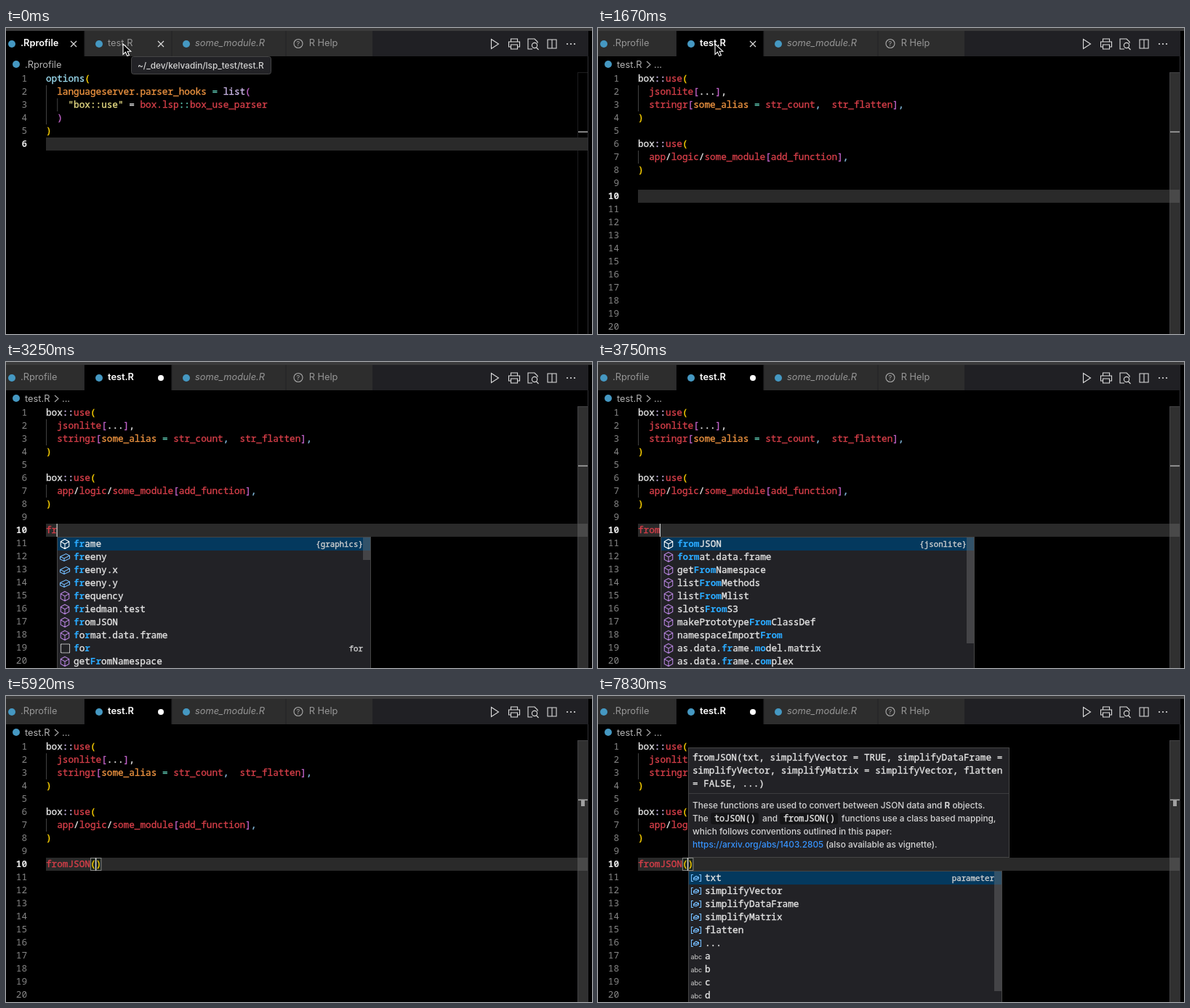
An HTML page that plays this animation: 806 px wide and 422 px high, repeating every 8000 ms.

```html
<!DOCTYPE html>
<html lang="en">
<head>
<meta charset="utf-8">
<title>Editor completion</title>
<style>
html, body { margin: 0; width: 100%; height: 100%; overflow: hidden; background: #000; }
svg { display: block; }
text { white-space: pre; }
.mono { font: 500 12.7px "Noto Sans Mono", "DejaVu Sans Mono", monospace; stroke-width: .35; }
.ui { font: 12.8px Inter, "Open Sans", sans-serif; }
.ui.small { font-size: 11.8px; font-weight: 500; }
.ui.tiny { font-size: 9px; }
.ui.italic { font-style: italic; }
.ui.active { font-weight: 600; }
.mono.current { font-weight: 700; }
.line { fill: none; stroke-width: 1.1; }
</style>
</head>
<body>
<svg id="stage" width="806" height="422"></svg>
<script>
const LOOP = 8000, CHAR = 7.62, LEFT = 55;
const SWITCH = 830, READY = 1000, TYPING = 2670, ACCEPT = 5080, CALL = 5830;
const COLORS = {
  w: '#e4e4e4', r: '#d63f49', o: '#ee9440', s: '#e6db83', c: '#9cdcf0', l: '#cdb9ea',
  p: '#c062c8', y: '#ffd400', t: '#5fc9b4', k: '#7fb6d8', b: '#2aaaff', g: '#d0d0d0'
};
const stage = document.getElementById('stage');
const timed = [];

// Adds markup that is visible from one time to another.
function show(markup, from = 0, to = LOOP) {
  const g = document.createElementNS('http://www.w3.org/2000/svg', 'g');
  g.innerHTML = markup;
  stage.append(g);
  timed.push({ g, from, to });
  return g;
}

const rect = (x, y, w, h, fill, more = '') =>
  `<rect x="${x}" y="${y}" width="${w}" height="${h}" fill="${fill}" ${more}/>`;
const path = (d, color, x = 0, y = 0) =>
  `<path class="line" d="${d}" stroke="${color}" transform="translate(${x} ${y})"/>`;
const dot = (x, y, r, fill) => `<circle cx="${x}" cy="${y}" r="${r}" fill="${fill}"/>`;
const ui = (x, y, str, fill = '#ccc', kind = '') =>
  `<text class="ui ${kind}" x="${x}" y="${y + 3.8}" fill="${fill}">${str}</text>`;
const small = (x, y, str) => ui(x, y, str, '#d4d4d4', 'small');

// "~r" starts a run in the colour r; matched letters (~b) are bold.
function mono(x, y, str, more = '') {
  const runs = str.split('~').slice(1).map(run => {
    const color = COLORS[run[0]];
    const ink = run[0] === 'b' ? 'font-weight="700"' : `stroke="${color}"`;
    return `<tspan fill="${color}" ${ink}>${run.slice(1)}</tspan>`;
  });
  return `<text class="mono" x="${x}" y="${y + 4}" ${more}>${runs.join('')}</text>`;
}

const rowY = n => 52 + 18 * n;
const guide = (col, first, last) =>
  rect(LEFT + col * CHAR, rowY(first) - 9, 1, (last - first + 1) * 18, '#404040');

function editor(lines, count, active, guides) {
  let out = rect(LEFT, rowY(active) - 9, 745, 18, '#2a2a2a') + guides;
  for (let n = 1; n <= count; n++) {
    const current = n === active;
    out += `<text class="mono ${current ? 'current' : ''}" x="29" y="${rowY(n) + 4}" ` +
      `text-anchor="end" fill="${current ? '#e4e4e4' : '#858585'}">${n}</text>`;
  }
  lines.forEach((line, i) => {
    const str = line.trimStart();
    out += mono(LEFT + (line.length - str.length) * CHAR, rowY(i + 1), str);
  });
  return out;
}

// Window frame, tabs and toolbar
const R_BLUE = '#4598c2';
const cross = x => path('M-4-4L4 4M4-4L-4 4', '#ddd', x, 22);
show(rect(0, 0, 806, 4, '#3b3b3c') + rect(0, 4, 801, 35, '#202024') +
  rect(0, 4, 504, 35, '#2d2d2d') +
  [107.5, 227.5, 384.5].map(x => rect(x, 4, 1, 35, '#222224')).join('') +
  rect(786, 61, 1, 361, '#1d1d1f') + rect(786, 61, 15, 1, '#1d1d1f') + rect(800, 39, 1, 383, '#303033'));

function tabs(active) {
  const label = (i, x, str) => i === active
    ? ui(x, 21.5, str, '#fff', 'active') : ui(x, 21.5, str, '#969696');
  return rect(active * 108, 4, active ? 119.5 : 107.5, 35, '#000') +
    [8, 128, 248].map(x => dot(x, 22, 5, R_BLUE)).join('') +
    label(0, 20, '.Rprofile') + label(1, 140, 'test.R') +
    ui(260, 21.5, 'some_module.R', '#969696', 'italic') +
    `<circle class="line" cx="402" cy="21.5" r="6" stroke="#aaa"/>` +
    ui(399.6, 21.2, '?', '#aaa', 'tiny') + ui(416.7, 21.5, 'R Help', '#969696') +
    dot(14, 50, 5, R_BLUE) + ui(26, 51, active ? 'test.R' : '.Rprofile', '#b4b4b4');
}
show(tabs(0) + cross(93) + cross(213), 0, SWITCH);
show(tabs(1), SWITCH);
show(cross(213), SWITCH, TYPING);
show(dot(213, 22, 4, '#fff'), TYPING);
show(path('M67 46L72 50.5L67 55', '#aaa') + ui(77, 51, '...', '#b4b4b4'), READY);

const actions =
  path('M-4.5-6.5L5.5 0L-4.5 6.5Z', '#ddd', 672, 22) +
  path('M-4.5-3V-7H4.5V-3M-4.5 4H-7.5V-3H7.5V4H4.5M-4.5 1H4.5V7H-4.5Z', '#ddd', 699, 22) +
  path('M-1 7H-7V-7H2L6-3V-1M7.5 8L4.5 5', '#ddd', 725, 22) +
  `<circle class="line" cx="727" cy="24" r="3.6" stroke="#ddd"/>`;
show(actions, 0, SWITCH);
show(actions, READY);
show(path('M-6-6H6V6H-6ZM0-6V6', '#ddd', 751, 22) +
  [772, 777, 782].map(x => dot(x, 22, 1.1, '#ddd')).join(''));

// Editor contents
show(editor([
  '~coptions~y(',
  '  ~olanguageserver.parser_hooks~w ~t=~w ~llist~p(',
  '    ~s"box::use"~w = ~rbox.lsp~t::~rbox_use_parser',
  '  ~p)',
  '~y)'
], 6, 6, guide(0, 2, 4) + guide(2, 3, 3)), 0, SWITCH);

show(editor([
  '~wbox~l::~ruse~y(',
  '  ~rjsonlite~p[~w...~p]~w,',
  '  ~rstringr~p[~osome_alias~w ~t=~w ~rstr_count~k,  ~rstr_flatten~p]~k,',
  '~y)',
  '',
  '~wbox~l::~ruse~y(',
  '  ~rapp~w/~rlogic~w/~rsome_module~p[~radd_function~p]~k,',
  '~y)'
], 20, 10, guide(0, 2, 3) + guide(0, 7, 7)), SWITCH);

show(rect(786, 61, 14, 361, '#797979', 'opacity=".4"'), READY);
show(rect(787, 142.5, 13, 1.6, '#a5a5a5'));
show(rect(791, 143, 5, 9, '#a0a0a0'), ACCEPT);

const strokes = [
  [330, 0, ''], [910, 0, ''], [TYPING, 1, 'f'], [2920, 2, 'fr'], [3500, 3, 'fro'],
  [3750, 4, 'from'], [ACCEPT, 8, 'fromJSON'], [CALL, 9, 'fromJSON']
];
strokes.forEach(([from, , str], i) => {
  if (str) show(mono(LEFT, rowY(10), '~r' + str), from, strokes[i + 1]?.[0]);
});
const parenBox = col =>
  rect(LEFT + col * CHAR + .5, 223.5, 6.8, 17, '#1a211a', 'stroke="#888"');
show(parenBox(8) + parenBox(9) + mono(LEFT + 8 * CHAR, rowY(10), '~y()'), CALL);
const caret = show(rect(0, 0, 1.2, 18, '#d0d0d0'));

// Completion lists: each item is an icon key followed by its label
const CUBE = 'M0-6.5L5.7-3.4V3.4L0 6.5L-5.7 3.4V-3.4ZM-5.7-3.4L0 0L5.7-3.4M0 0V6.5';
const BLOCK = 'M-6.5-.5L1.5-4.5L6.5-2V2L-1 5.5L-6.5 3ZM-6.5-.5L-1 2L6.5-2M-1 2V5.5';
const ICONS = {
  W: (x, y) => path(CUBE, '#fff', x, y),
  F: (x, y) => path(CUBE, '#b180d7', x, y),
  D: (x, y) => path(BLOCK, '#75beff', x, y),
  S: (x, y) => `<rect class="line" x="${x - 5.5}" y="${y - 6}" width="12" height="12" stroke="#ddd" stroke-dasharray="1.5 .5"/>`,
  P: (x, y) => path('M-4-4.5H-6.5V4.5H-4M4-4.5H6.5V4.5H4M-3.5 0L0-2.6L3.5-1.2V1L0 3L-3.5 2ZM-3.5 0L0 1L3.5-1.2', '#75beff', x, y),
  A: (x, y) => ui(x - 7.5, y - .2, 'abc', '#ccc', 'tiny')
};
const detail = (right, y, str) =>
  mono(right, y, '~g' + str, 'text-anchor="end" style="font-size:10.8px"');

function list(x, width, items, note, thumb) {
  return rect(x + .5, 241.5, width - 1, 190, '#222226', 'stroke="#454545"') +
    rect(x + 1, 242, width - 2, 18, '#04395e') +
    items.map((item, i) => {
      const y = 251 + 18 * i;
      return ICONS[item[0]](x + 11, y) + mono(x + 23, y, item.slice(1));
    }).join('') +
    detail(x + width - 11, 251, note) +
    rect(x + width - 11, 242, 10, thumb, '#797979', 'opacity=".4" class="thumb"');
}

show(list(70, 432, [
  'W~bfr~wame', 'D~bfr~weeny', 'D~bfr~weeny.x', 'D~bfr~weeny.y', 'F~bfr~wequency',
  'F~bfr~wiedman.test', 'F~bfr~womJSON', 'F~bf~wo~br~wmat.data.frame', 'S~bf~wo~br',
  'F~wget~bFr~womNamespace'
], '{graphics}', 31) + detail(491, 395, 'for'), 3250, 3500);

const fromItems = n => {
  const hit = 'From'.slice(0, n), rest = 'From'.slice(n);
  const from = `~b${hit}~w${rest}`;
  return [
    'W' + from.replace('F', 'f') + 'JSON', `F~b${'form'.slice(0, n)}~w${'form'.slice(n)}at.data.frame`,
    `F~wget${from}Namespace`, `F~wlist${from}Methods`, `F~wlist${from}Mlist`, `F~wslots${from}S3`,
    `F~wmakePrototype${from}ClassDef`, `F~wnamespaceImport${from}`,
    'F~was.data.~bfr~wame.~bmo~wdel.matrix', 'F~was.data.~bfr~wame.c~bom~wplex'
  ];
};
show(list(78, 432, fromItems(3), '{jsonlite}', 120), 3500, 3750);
const fromThumb = show(list(86, 432, fromItems(4), '{jsonlite}', 146), 3750, ACCEPT)
  .querySelector('.thumb');

show(list(124, 432, [
  ...['txt', 'simplifyVector', 'simplifyDataFrame', 'simplifyMatrix', 'flatten', '...'].map(s => 'P~w' + s),
  ...['a', 'b', 'c', 'd'].map(s => 'A~w' + s)
], 'parameter', 165), 7250);

// Signature help
const code = (x, str, w) => rect(x - 5, 161, w, 16, '#151517', 'rx="3"') +
  mono(x, 168.5, '~w' + str, 'style="font-size:11.85px"');
show(rect(124.5, 71.5, 441, 151, '#222226', 'stroke="#454545"') + rect(125, 134, 440, 1, '#3c3c3f') +
  mono(130, 85, '~wfromJSON(txt, simplifyVector = TRUE, simplifyDataFrame =') +
  mono(130, 103, '~wsimplifyVector, simplifyMatrix = simplifyVector, flatten') +
  mono(130, 121, '~w= FALSE, ...)') +
  small(130, 151, 'These functions are used to convert between JSON data and <tspan font-weight="700">R</tspan> objects.') +
  small(130, 169, 'The') + code(160, 'toJSON()', 66) + small(226, 169, 'and') +
  code(255, 'fromJSON()', 80) + small(335, 169, 'functions use a class based mapping,') +
  small(130, 187, 'which follows conventions outlined in this paper:') +
  small(130, 205, '<tspan fill="#3794ff">https://arxiv.org/abs/1403.2805</tspan> (also available as vignette).'), 6080);

// Tab tooltip, click rings and pointer
show(rect(172.5, 39.5, 192, 24, '#222226', 'rx="3" stroke="#454545"') +
  small(181, 52, '~/_dev/kelvadin/lsp_test/test.R'), 0, SWITCH);
const rings = show([22, 18].map(r =>
  `<circle class="line" cx="162" cy="24" r="${r}" stroke="#fff" style="stroke-width:1.5"/>`).join(''), SWITCH, 1250);
show('<path d="M161 22V36.5L164.5 33.2L166.8 38.6L169.4 37.5L167.1 32.2H171.8Z" fill="#000" stroke="#fff" stroke-width="1.1"/>', 0, TYPING);

const clamp = v => Math.max(0, Math.min(1, v));

function draw(t) {
  for (const { g, from, to } of timed) g.style.display = t >= from && t < to ? '' : 'none';
  rings.style.opacity = clamp((1250 - t) / 330);
  fromThumb.style.opacity = .4 * Math.max(.08, clamp((4960 - t) / 500));

  // The caret restarts its half-second blink at every keystroke.
  const last = strokes.filter(s => s[0] <= t).pop();
  const lit = last && Math.floor((t - last[0]) / 500) % 2 === 0;
  caret.style.display = lit ? '' : 'none';
  if (lit) caret.setAttribute('transform',
    `translate(${LEFT + last[1] * CHAR - .7} ${rowY(t < SWITCH ? 6 : 10) - 9})`);
}

const start = performance.now();
function tick() {
  draw((performance.now() - start) % LOOP);
  requestAnimationFrame(tick);
}
tick();
</script>
</body>
</html>
```
